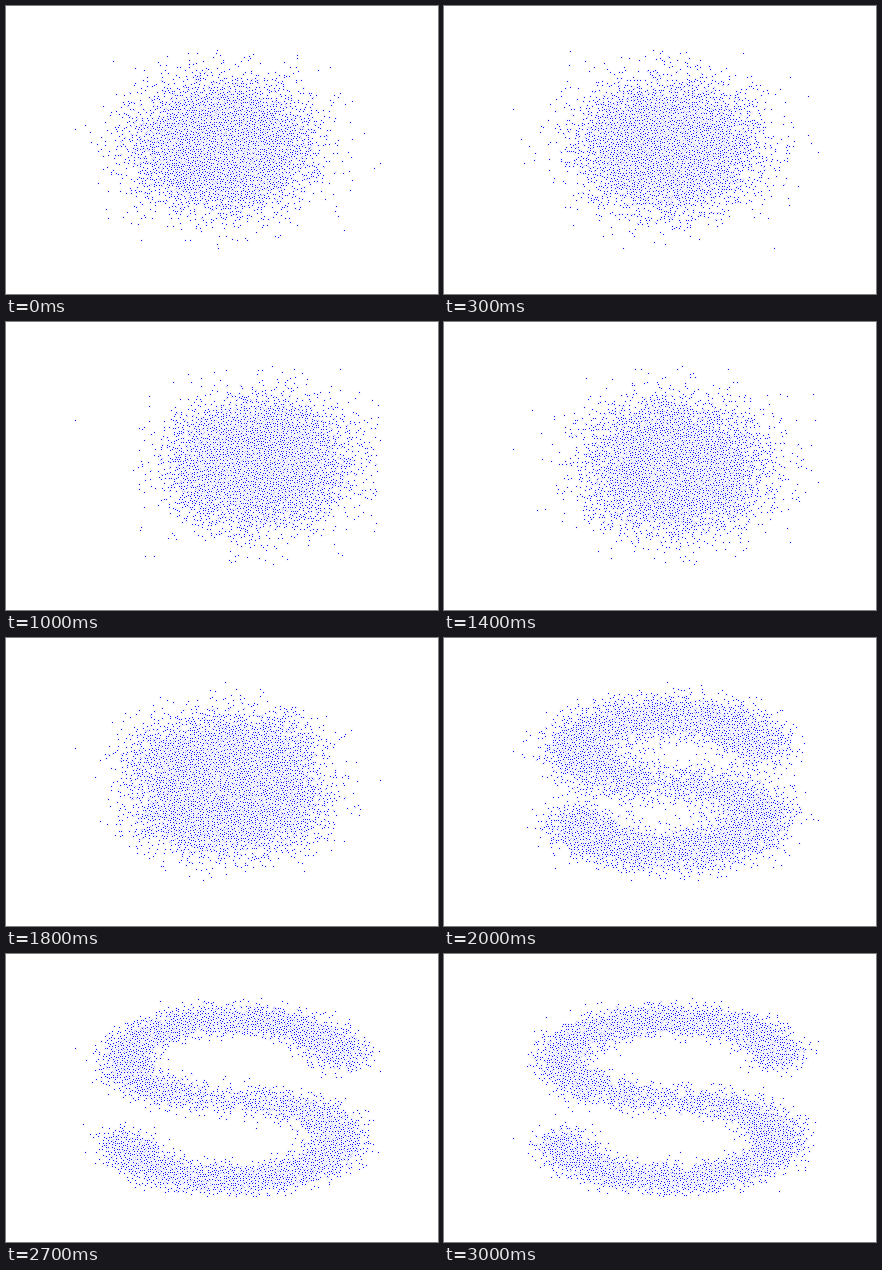
A matplotlib script that plays this animation: 432x288 px, repeating every 3100 ms.

```python
import numpy as np
import matplotlib.pyplot as plt
from matplotlib.animation import FuncAnimation

W, H = 432, 288
FRAMES, STEP_MS = 31, 100
POINTS = 10000
BOX_X, BOX_Y = (69.2, 373.6), (44.4, 242.1)


def mix(a, b, k):
    return a + (b - a) * k


def smooth(k):
    k = np.clip(k, 0, 1)
    return k * k * (3 - 2 * k)


def bump(step, middle, width):
    return np.exp(-((step - middle) / width) ** 2)


def fit(values, low, high):
    """Fold strays back inside and let the outermost points touch the box."""
    values = np.where(values < low, 2 * low - values, values)
    values = np.where(values > high, 2 * high - values, values)
    values[values.argmin()] = low
    values[values.argmax()] = high
    return values


def cloud(step):
    """Gaussian noise that gathers into an S-shaped curve."""
    rng = np.random.default_rng(100 + step)
    order = smooth((step - 14) / 8)
    wobble = rng.normal(0, 3 * (1 - order), 2)
    cx = 220 + 6 * order + 36 * bump(step, 11, 3) + wobble[0]
    cy = 145 - 10 * bump(step, 7.5, 3) + wobble[1]

    u = rng.uniform(-1, 1, POINTS)
    t = 1.5 * np.pi * np.sign(u) * np.abs(u) ** mix(1, 0.8, order)
    x = cx + 108 * order * np.sin(t)
    y = cy + 40 * order * np.sign(t) * (1 - np.cos(t))
    x += rng.normal(0, mix(40, 14, order), POINTS)
    y += rng.normal(0, mix(29, 7.5, order), POINTS)
    return np.column_stack([fit(x, *BOX_X), fit(y, *BOX_Y)])


fig = plt.figure(figsize=(W / 72, H / 72), dpi=72, facecolor="white")
ax = fig.add_axes([0, 0, 1, 1])
ax.set_xlim(0, W)
ax.set_ylim(H, 0)
ax.axis("off")

# white rims hide crowded neighbours, so dense areas stay evenly speckled
dots = ax.scatter(*cloud(1).T, s=5, color="blue", edgecolor="white", linewidth=1)


def draw(i):
    # the opening picture holds for two steps
    dots.set_offsets(cloud(max(i, 1)))
    return (dots,)


anim = FuncAnimation(fig, draw, frames=FRAMES, interval=STEP_MS,
                     repeat=True, repeat_delay=0)
plt.show()
```
